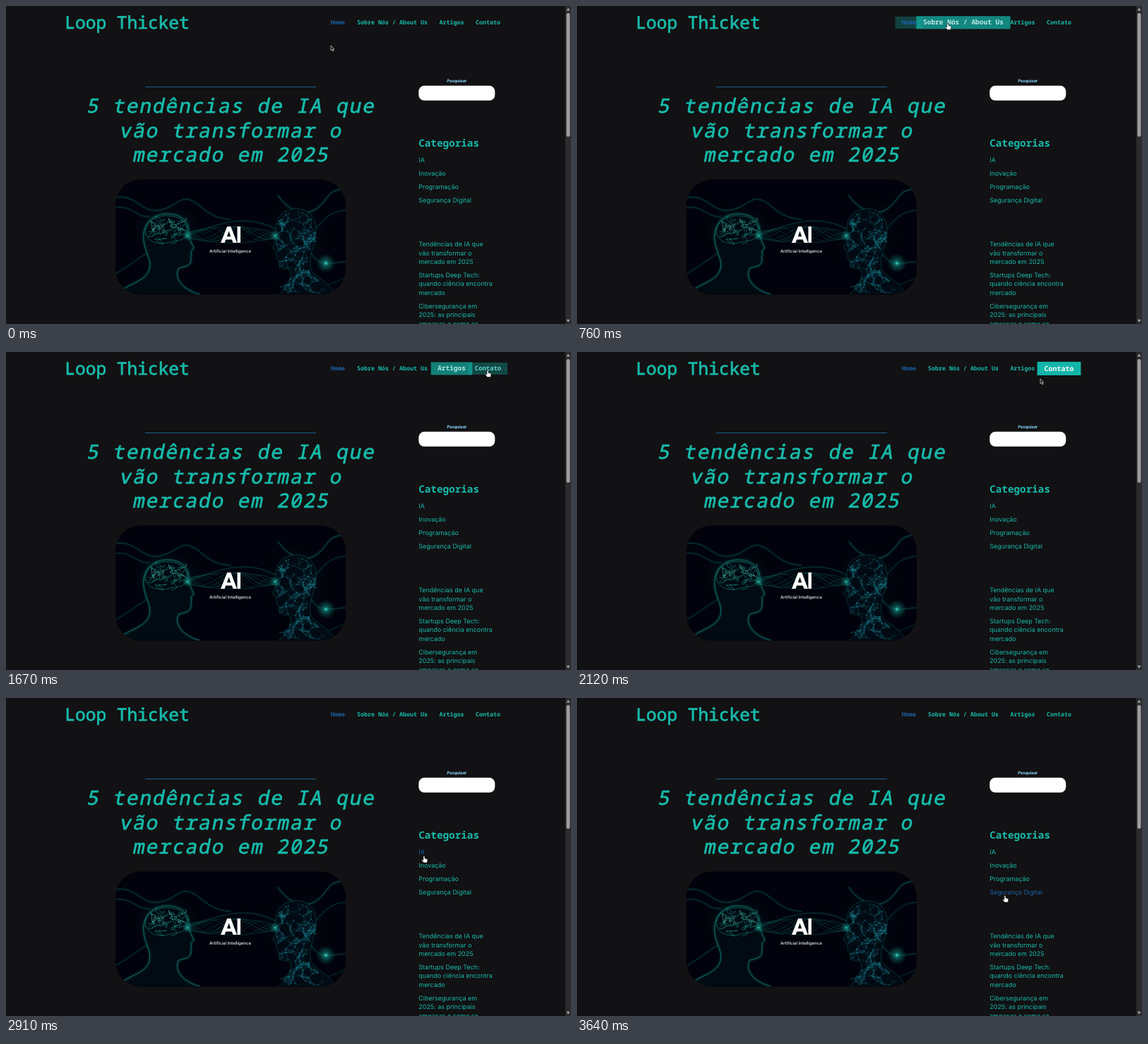
These frames come from a looping animation (800x450 px, 3.67 s). An HTML page:

```html
<!DOCTYPE html>
<html lang="pt">
<head>
<meta charset="utf-8">
<style>
  html, body { margin: 0; width: 100%; height: 100%; overflow: hidden; background: #121113; }
  svg { display: block; width: 800px; height: 450px; text-rendering: geometricPrecision; }
  text { fill: #17bbab; white-space: pre; }
  .mono { font-family: "Noto Sans Mono", "Liberation Mono", monospace; }
  .medium { stroke: #17bbab; stroke-width: .75px; }
  .sans { font-family: Inter, "Open Sans", sans-serif; }
  .wire { fill: none; stroke: #178f83; stroke-linecap: round; stroke-linejoin: round; }
</style>
</head>
<body>
<svg id="stage" viewBox="0 0 800 450">
  <defs>
    <clipPath id="card"><rect x="155" y="245.500" width="326" height="163" rx="36"/></clipPath>
    <filter id="blur" x="-30%" y="-30%" width="160%" height="160%"><feGaussianBlur stdDeviation="1.800"/></filter>
    <radialGradient id="glow">
      <stop offset="0" stop-color="#3fe0cc"/>
      <stop offset=".25" stop-color="#159083" stop-opacity=".6"/>
      <stop offset="1" stop-color="#0b5f58" stop-opacity="0"/>
    </radialGradient>
  </defs>

  <g id="page">
    <path d="M197 114.500H439" stroke="#1a5f92" stroke-width="1"/>
    <rect x="584.300" y="112.800" width="108" height="21" rx="8" fill="#fff"/>
  </g>

  <g id="art" clip-path="url(#card)">
    <rect x="155" y="245" width="326" height="164" fill="#01020b"/>
    <ellipse cx="228" cy="318" rx="50" ry="38" fill="url(#glow)" opacity=".22"/>
    <ellipse cx="412" cy="325" rx="50" ry="55" fill="url(#glow)" opacity=".12"/>
  </g>

  <g>
    <rect x="792" width="8" height="450" fill="#2c2b2d"/>
    <rect x="793.500" y="10" width="5" height="175" rx="2.500" fill="#9f9f9f"/>
    <path d="M793.500 6.500L796 2.500L798.500 6.500ZM793.500 443.800L796 447.800L798.500 443.800Z" fill="#a5a5a5"/>
  </g>

  <g id="nav"></g>
  <g id="cursor" stroke-linejoin="round">
    <path id="arrow" d="M0 0V6.800L1.600 5.400L2.700 8L3.900 7.500L2.800 5H4.900Z" fill="#111" stroke="#ddd" stroke-width=".7"/>
    <path id="hand" d="M-1.100 .8Q0 -.6 1 .8V3.500L4.200 4.300Q5 4.600 4.900 5.500L4.200 9.600H-.6L-3.200 6.300Q-3.300 5.100 -2.200 5.300L-1.100 6.100Z" fill="#fff" stroke="#111" stroke-width=".6"/>
  </g>
</svg>

<script>
const LOOP = 3670, FADE = 300;
const TEAL = [23, 187, 171], BLUE = '#1b62aa';
const byId = id => document.getElementById(id);

function add(parent, tag, attrs, content = '') {
  const el = document.createElementNS('http://www.w3.org/2000/svg', tag);
  for (const key in attrs) el.setAttribute(key, attrs[key]);
  el.textContent = content;
  parent.append(el);
  return el;
}

const page = byId('page'), art = byId('art'), nav = byId('nav');

function label(parent, font, x, y, size, weight, content, extra = {}) {
  return add(parent, 'text', { class: font, x, y, 'font-size': size, 'font-weight': weight, ...extra }, content);
}

// Page text
label(page, 'mono medium', 83.3, 32.2, 24.5, 500, 'Loop Thicket');
label(page, 'mono', 584.2, 198.6, 14.3, 600, 'Categorias');
label(page, 'sans', 638.2, 107.6, 6, 700, 'Pesquisar',
  { 'text-anchor': 'middle', 'font-style': 'italic', 'letter-spacing': -0.2, style: 'fill:#86d3f5' });

['5 tendências de IA que', 'vão transformar o', 'mercado em 2025'].forEach((line, i) =>
  label(page, 'mono medium', 0, 0, 27.8, 500, line, {
    'text-anchor': 'middle', 'letter-spacing': 1.9,
    transform: `translate(318 ${151.2 + 34.6 * i}) skewX(-11)`
  }));

const links = ['IA', 'Inovação', 'Programação', 'Segurança Digital'].map((name, i) => ({
  y: 218 + 18.8 * i,
  el: label(page, 'sans', 584.3, 221.2 + 18.8 * i, 8.95, 400, name)
}));

[
  ['Tendências de IA que', 'vão transformar o', 'mercado em 2025'],
  ['Startups Deep Tech:', 'quando ciência encontra', 'mercado'],
  ['Cibersegurança em', '2025: as principais', 'ameaças e como se']
].forEach((post, p) => post.forEach((line, i) =>
  label(page, 'sans', 584.3, 340.2 + 43.7 * p + 12.5 * i, 8.95, 400, line)));

// Illustration
let seed = 11;
const random = () => (seed = (seed * 16807) % 2147483647) / 2147483647;
const wire = (d, width = 0.7, opacity = 0.8, extra = {}) =>
  add(art, 'path', { class: 'wire', d, 'stroke-width': width, opacity, ...extra });
function glowWire(d, width = 1, opacity = 0.7) {
  wire(d, width * 3, opacity * 0.4, { filter: 'url(#blur)' });
  wire(d, width, opacity);
}

glowWire('M155 271C185 266 190 292 215 289S245 268 262 275S285 300 318 302', 0.9, 0.4);
glowWire('M155 285C180 282 184 300 204 298', 0.8, 0.4);
glowWire('M385 268C400 290 424 300 442 285S452 262 481 258', 1, 0.5);
glowWire('M436 318C452 300 460 290 481 289', 0.8, 0.35);
glowWire('M155 379C185 362 202 342 250 326S340 290 386 318', 0.6, 0.5);
glowWire('M432 350C446 372 462 362 481 362', 0.8, 0.4);
glowWire('M432 385C446 405 466 390 481 384', 0.7, 0.3);

const profile = 'M158 408C170 392 197 392 203 372C206 360 199 352 196 338' +
  'C190 312 205 294 228 294C248 294 259 305 259 319C258 328 263 336 266 342' +
  'C266 345 261 345 262 349C264 352 261 354 262 358C263 369 251 369 245 371C239 380 243 399 274 408';
add(art, 'path', { d: profile + 'Z', fill: '#020a12' });
glowWire(profile, 0.9, 0.75);

for (let i = 0; i < 34; i++) {
  const angle = random() * 6.283, reach = Math.sqrt(random());
  const x = 227 + 25 * reach * Math.cos(angle), y = 317 + 16 * reach * Math.sin(angle);
  const jitter = () => ((random() - 0.5) * 15).toFixed(1);
  wire(`M${x} ${y}q${jitter()} ${jitter()} ${jitter()} ${jitter()}t${jitter()} ${jitter()}`, 0.7, 0.7,
    { style: `stroke:${i % 4 ? '#1ea294' : '#58c9b5'}` });
}
wire('M198 323C194 305 214 295 230 297C251 297 260 312 255 324C252 334 240 331 229 335C217 338 202 335 198 323Z', 0.8, 0.7);

// Strands between the heads
for (let k = 0; k < 11; k++) {
  let d = '';
  for (let x = 254; x <= 386; x += 3) {
    const u = (x - 254) / 132;
    const y = 324 + (4 + 8 * Math.sin(u * Math.PI)) * Math.sin(u * (7 + k % 4) + k * 1.7);
    d += (d ? 'L' : 'M') + x + ' ' + y.toFixed(1);
  }
  wire(d, 0.5, 0.3 + 0.05 * (k % 5));
}

// Wireframe head
const meshOutline = 'M386 408C402 394 407 380 400 372C393 373 385 371 386 360C381 357 385 354 382 350' +
  'C384 345 377 345 378 341C381 334 385 328 382 320C380 298 394 287 411 287' +
  'C433 287 442 305 438 327C436 342 429 352 431 370C434 383 456 387 466 408';
add(art, 'path', { d: meshOutline + 'Z', fill: '#020b14' });
wire(meshOutline, 0.6, 0.5);

const nodes = [];
while (nodes.length < 170) {
  const x = 378 + random() * 88, y = 287 + random() * 121;
  const inHead = ((x - 410) / 29) ** 2 + ((y - 325) / 37) ** 2 < 1;
  const inJaw = y > 340 && y < 371 && x > 385 && x < 430;
  const inBody = y > 368 && Math.abs(x - 420) < 13 + Math.max(0, y - 378);
  if (inHead || inJaw || inBody) nodes.push([x, y]);
}
let mesh = '';
nodes.forEach(([x, y], i) => {
  nodes.slice(i + 1).forEach(([x2, y2]) => {
    if (Math.hypot(x - x2, y - y2) < 11) mesh += `M${x.toFixed(1)} ${y.toFixed(1)}L${x2.toFixed(1)} ${y2.toFixed(1)}`;
  });
  add(art, 'circle', { cx: x, cy: y, r: 0.3 + random() * 0.4, fill: '#2fa9ad', opacity: 0.7 });
});
wire(mesh, 0.4, 0.5, { style: 'stroke:#1a7f8c' });

[[257, 325, 8], [381, 325, 8], [453, 364, 14]].forEach(([cx, cy, r]) =>
  add(art, 'circle', { cx, cy, r, fill: 'url(#glow)' }));

add(art, 'path', {
  d: 'M304 335L313.200 312H318.300L327 335H321.500L319.800 330.500H311.200L309.500 335ZM312.800 326.300H318.200L315.600 318.500ZM327.500 312H332V335H327.500Z',
  fill: '#fff', 'fill-rule': 'evenodd'
});
label(art, 'sans', 317.5, 348.6, 6.05, 500, 'Artificial Intelligence', { 'text-anchor': 'middle', style: 'fill:#eef5f5' });

// Menu: name, centre, hover start and end
const menu = [
  ['Home', 470, 330, 635],
  ['Sobre Nós / About Us', 547, 635, 1170],
  ['Artigos', 631, 1170, 1605],
  ['Contato', 682.5, 1605, 2110]
].map(([name, x, on, off]) => {
  const g = add(nav, 'g', {}), width = name.length * 5 + 16.7;
  const box = add(g, 'rect', { x: -width / 2, y: -8, width, height: 16, fill: '#14b9ad' });
  const text = label(g, 'mono', 0, 2.7, 8.33, 600, name, { 'text-anchor': 'middle' });
  return { g, box, text, x, on, off, active: name === 'Home' };
});

// CSS "ease" curve
function ease(x) {
  if (x <= 0 || x >= 1) return x <= 0 ? 0 : 1;
  let lo = 0, hi = 1, s;
  for (let i = 0; i < 20; i++) {
    s = (lo + hi) / 2;
    if (0.75 * s * (1 - s) + s ** 3 < x) lo = s; else hi = s;
  }
  return 0.3 * s * (1 - s) ** 2 + 3 * s * s * (1 - s) + s ** 3;
}

// Pointer path: time, x, y
const path = [
  [0, 460, 56], [330, 466, 31], [480, 474, 25], [635, 493, 24], [760, 525, 24], [950, 580, 25],
  [1120, 604, 25], [1190, 617, 25], [1400, 636, 25], [1605, 663, 26], [1670, 682, 26],
  [1850, 690, 27], [2000, 676, 29], [2120, 656, 38], [2450, 625, 120], [2750, 597, 200],
  [2910, 592, 223.5], [3150, 595, 236], [3400, 601, 258], [3640, 606, 279.5], [3670, 606, 280]
];

function pointer(t) {
  const i = Math.max(0, path.findIndex(p => p[0] > t) - 1);
  const a = path[i], b = path[i + 1], span = b[0] - a[0], u = (t - a[0]) / span;
  const before = path[i - 1] || a, after = path[i + 2] || b;
  return [1, 2].map(k => {
    const m0 = (b[k] - before[k]) / (b[0] - before[0]) * span;
    const m1 = (after[k] - a[k]) / (after[0] - a[0]) * span;
    const d = b[k] - a[k];
    return a[k] + u * (m0 + u * (3 * d - 2 * m0 - m1 + u * (m0 + m1 - 2 * d)));
  });
}

function draw(t) {
  for (const item of menu) {
    const h = item.amount = ease((t - item.on) / FADE) - ease((t - item.off) / FADE);
    item.g.setAttribute('transform', `translate(${item.x} 23.400) scale(${1 + 0.2 * h})`);
    item.box.setAttribute('opacity', h);
    item.text.style.fill = item.active ? BLUE : `rgb(${TEAL.map(c => c + (255 - c) * h)})`;
  }
  [...menu].sort((a, b) => a.amount - b.amount).forEach(item => nav.append(item.g));

  const [x, y] = pointer(t);
  let pointing = t >= menu[0].on && t < menu[3].off;
  for (const link of links) {
    const over = t > 2600 && Math.abs(y - link.y) < 6.5;
    link.el.style.fill = over ? BLUE : '';
    pointing = pointing || over;
  }
  byId('cursor').setAttribute('transform', `translate(${x} ${y})`);
  byId('hand').style.display = pointing ? '' : 'none';
  byId('arrow').style.display = pointing ? 'none' : '';
}

let start;
function tick(now) {
  start ??= now;
  draw((now - start) % LOOP);
  requestAnimationFrame(tick);
}
draw(0);
requestAnimationFrame(tick);
</script>
</body>
</html>
```
